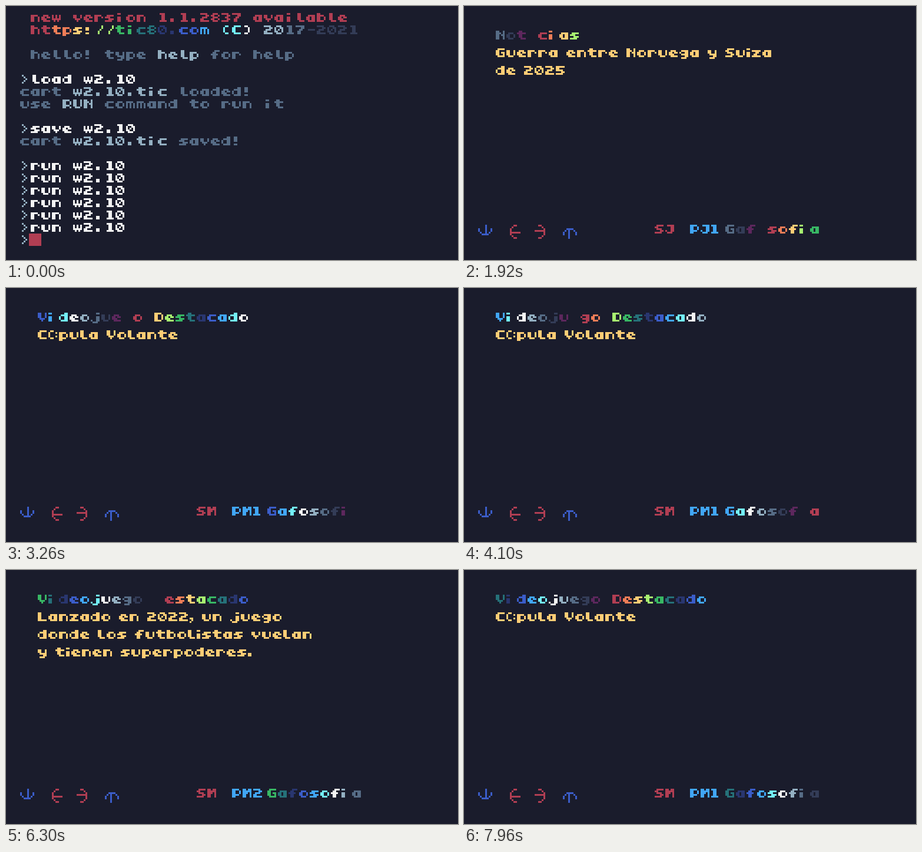
Recreate the animation shown at these times as an HTML page. Size 768 by 432 pixels, loop 8000 ms.

```html
<!DOCTYPE html>
<html lang="es">
<head>
<meta charset="utf-8">
<title>Gafosofia</title>
<style>
  html, body { margin: 0; width: 100%; height: 100%; overflow: hidden; background: #1a1c2c; }
  svg { display: block; width: 768px; height: 432px; fill: none; stroke-width: 1; stroke-linecap: square; }
</style>
</head>
<body>
<svg id="stage" viewBox="-8 -4 256 144" shape-rendering="crispEdges"></svg>
<script>
const LOOP = 8000;
const COLORS = ['#5d275d', '#1a1c2c', '#b13e53', '#ef7d57', '#ffcd75', '#a7f070', '#38b764', '#257179',
  '#29366f', '#3b5dc9', '#41a6f6', '#73eff7', '#f4f4f4', '#94b0c2', '#566c86', '#333c57'];
const RED = 2, YELLOW = 4, BLUE = 9, SKY = 10, WHITE = 12, LIGHT = 13, GREY = 14;

// Pen strokes of each letter, one unit wide; ú stands for the garbled letter
const PEN = {
  a: 'M4 4H1V1H4V4M0 2V3M3 2V3',
  b: 'M3 4H0V0H1V4M1 1H3M4 2V3',
  c: 'M4 1H1V4H4M0 2V3',
  d: 'M1 1H3V0H4V4H1M0 2V3M3 1V4',
  e: 'M1 1H3M0 2V3M1 1V4H4M3 2H4M1 3H2',
  f: 'M4 0H2M1 1V4H2V0M0 2H3',
  g: 'M1 1H4V4H3V1M0 2h0M1 3H3M1 5H3',
  h: 'M0 0V4H1V0M1 1H3M4 2V4',
  i: 'M0 0H1M0 2V4H1V2',
  j: 'M3 0H4M4 2V4H3V2M1 5H3M0 4h0',
  l: 'M0 0V3H1V0M1 4H3',
  m: 'M0 4V1H3M2 1V4M4 2V4',
  n: 'M0 4V1H3M1 1V4H0M4 2V4',
  o: 'M1 1H3M1 4H3M0 2V3H1V2M4 2V3',
  p: 'M3 1H0V5H1V1M1 4H3M4 2V3',
  r: 'M3 1H0V4H1V1M4 2h0',
  s: 'M4 1H1M0 2H2M2 3H4M0 4H3',
  t: 'M1 0V3H2V0M0 1H4M2 4H4',
  u: 'M0 1V3H1V1M4 1V3M1 4H3',
  v: 'M0 1V2H1V1M4 1V2M1 3H3M2 4h0',
  w: 'M0 1V3H4V1M2 1V3M1 4h0M3 4h0',
  y: 'M0 1V2H1V1M4 1V4H3V3H1M1 5H3',
  z: 'M0 1H4M2 2H3M1 3H2M0 4H4',
  C: 'M4 0H1V4H4M0 1V3',
  D: 'M3 0H0V4H3M1 0V4M4 1V3',
  G: 'M4 0H1V4H4V2H3M0 1V3',
  J: 'M1 0H4V3H3V0M0 3h0M1 4H3',
  L: 'M0 0V4H4M1 0V4',
  M: 'M0 4V0H1V1H3V0H4V4M2 1V2M1 1V4',
  N: 'M0 0V4H1V0M4 0V4M2 1h0M3 2h0',
  P: 'M3 0H0V4H1V0M1 3H3M4 1V2',
  R: 'M3 0H0V4H1V0M1 3H3M4 1V2M4 4h0',
  S: 'M4 0H1M0 1H1M1 2H3M3 3H4M0 4H3',
  U: 'M0 0V3H1V0M4 0V3M1 4H3',
  V: 'M0 0V2H1V0M4 0V2M1 3H3M2 4h0',
  0: 'M1 0H3M0 1V3M4 1V3M1 4H3M3 1h0M2 2h0M1 3h0',
  1: 'M0 0H2V4M1 0V4M0 4H3',
  2: 'M0 0H3M3 1H4M1 2H3M0 3H1M0 4H4',
  3: 'M0 0H3M3 1H4M2 2H3M3 3H4M0 4H3',
  5: 'M4 0H0V2H3M1 1h0M3 3H4M0 4H3',
  7: 'M0 0H4V1H3M2 2H3M1 3V4H2V3',
  8: 'M1 0H3M1 2H3M1 4H3M0 1H1M4 1h0M0 3H1M4 3h0',
  'ú': 'M2 0H1M0 1V3M1 4H2M4 1h0M4 3h0',
  '!': 'M0 0V2H1V0M0 4H1',
  '.': 'M0 3V4H1V3',
  ',': 'M0 3H1V4M0 5h0',
  ':': 'M0 1V2H1V1M0 4H1',
  '/': 'M3 0V1M2 2h0M1 3V4',
  '(': 'M2 0H1M0 1V3M1 4H2',
  ')': 'M0 0H1M2 1V3M0 4H1',
  '-': 'M0 2H3',
  '>': 'M0 0h0M1 1h0M2 2h0M1 3h0M0 4h0'
};
const ARROW = 'M4 0V5M2 5H5M1 4h0M6 4h0M0 2V3M7 2V3';

const stage = document.getElementById('stage');

function add(parent, tag, attrs) {
  const el = document.createElementNS('http://www.w3.org/2000/svg', tag);
  for (const key in attrs) el.setAttribute(key, attrs[key]);
  return parent.appendChild(el);
}

function glyph(parent, ch, x, y, color) {
  return add(parent, 'path', {
    d: PEN[ch] || '', stroke: COLORS[color], transform: `translate(${x + .5} ${y + .5})`
  });
}

const label = (parent, text) => add(parent, 'g', { role: 'img', 'aria-label': text });
const advance = ch => ch === ' ' ? 4 : 'i!.,:'.includes(ch) ? 3 : 'l1'.includes(ch) ? 5 : 6;

// Proportional text
function print(parent, text, x, y, color) {
  const g = label(parent, text);
  for (const ch of text) {
    glyph(g, ch, x, y, color);
    x += advance(ch);
  }
}

// Console text on a 6 x 7 grid; color may depend on the letter's index
function type(parent, row, col, color, text) {
  const g = label(parent, text);
  [...text].forEach((ch, i) => {
    const inset = 'i!.,:l1/()->'.includes(ch) ? 1 : 0;
    glyph(g, ch, (col + i) * 6 + inset, row * 7, color.call ? color(i) : color);
  });
}

const cursor = (parent, col) =>
  add(parent, 'rect', { x: col * 6 - 1, y: 125, width: 7, height: 7, fill: COLORS[RED] });

// Letters whose colours run through the palette
const waves = [];
function wave(parent, text, x, y) {
  const g = label(parent, text);
  waves.push([...text].map((ch, i) => glyph(g, ch, x + i * 6, y, WHITE)));
}

function command(row, text) {
  type(shell, row, 0, LIGHT, '>');
  type(shell, row, 1, WHITE, text);
}

const shell = add(stage, 'g', {});
type(shell, 0, 1, RED, 'new version 1.1.2837 available');
type(shell, 1, 1, i => Math.min(15, 2 + (i >> 1)), 'https://tic80.com (C) 2017-2021');
type(shell, 3, 1, GREY, 'hello! type');
type(shell, 3, 13, LIGHT, 'help');
type(shell, 3, 18, GREY, 'for help');
command(5, 'load w2.10');
type(shell, 6, 0, GREY, 'cart');
type(shell, 6, 5, LIGHT, 'w2.10.tic');
type(shell, 6, 15, GREY, 'loaded!');
type(shell, 7, 0, GREY, 'use');
type(shell, 7, 4, LIGHT, 'RUN');
type(shell, 7, 8, GREY, 'command to run it');
command(9, 'save w2.10');
type(shell, 10, 0, GREY, 'cart');
type(shell, 10, 5, LIGHT, 'w2.10.tic');
type(shell, 10, 15, GREY, 'saved!');
for (let row = 12; row < 18; row++) command(row, 'run w2.10');
type(shell, 18, 0, LIGHT, '>');
const idle = add(shell, 'g', {});
cursor(idle, 1);
const typed = add(shell, 'g', {});
type(typed, 18, 1, WHITE, 'run w2.10');
cursor(typed, 10);

const reader = add(stage, 'g', {});
[[0, BLUE], [90, RED], [270, RED], [180, BLUE]].forEach(([turn, color], i) =>
  add(reader, 'path', {
    d: ARROW, stroke: COLORS[color],
    transform: `translate(${i * 16 + 4} 124) rotate(${turn}) translate(-3.5 -3.5)`
  }));
wave(reader, 'Gafosofia', 140, 120);

function page(section, number, title, lines) {
  const g = add(reader, 'g', {});
  wave(g, title, 10, 10);
  lines.forEach((line, i) => print(g, line, 10, 20 + i * 10, YELLOW));
  print(g, 'S' + section, 100, 120, RED);
  print(g, 'P' + section + number, 120, 120, SKY);
  return g;
}

const game = 'Videojuego Destacado';
const pages = [
  page('J', 1, 'Noticias', ['Guerra entre Noruega y Suiza', 'de 2025']),
  page('M', 1, game, ['Cúpula Volante']),
  page('M', 2, game, ['Lanzado en 2022, un juego', 'donde los futbolistas vuelan', 'y tienen superpoderes.'])
];

const show = (el, on) => el.setAttribute('display', on ? 'inline' : 'none');

function render(time) {
  const t = Math.floor(time % LOOP / 20) * 20;
  const running = t >= 1320;
  show(shell, !running);
  show(reader, running);
  show(idle, t < 960);
  show(typed, t >= 960);

  const current = t < 3120 ? 0 : t >= 4660 && t < 7160 ? 2 : 1;
  pages.forEach((p, i) => show(p, i === current));

  const shift = Math.floor(t / 50) + 8;
  for (const letters of waves)
    letters.forEach((el, i) => el.setAttribute('stroke', COLORS[(shift + i) % 16]));
}

const start = performance.now();
function tick() {
  render(performance.now() - start);
  requestAnimationFrame(tick);
}
tick();
</script>
</body>
</html>
```
